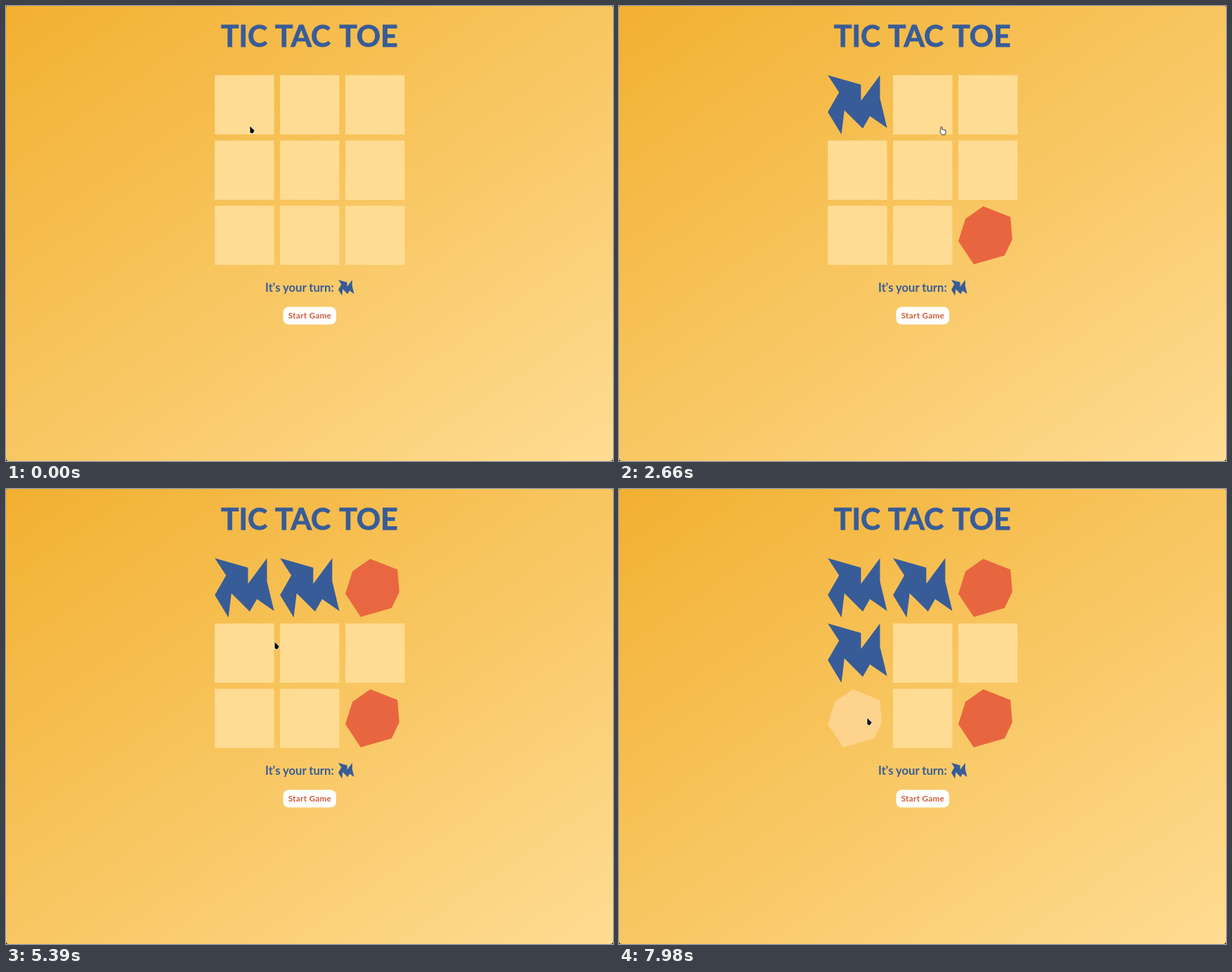
Write an HTML page that moves like this. It is 864x648 px and loops after 8 s.

```html
<!DOCTYPE html>
<html lang="en">
<head>
<meta charset="utf-8">
<title>Tic Tac Toe</title>
<style>
  html, body { margin: 0; width: 100%; height: 100%; overflow: hidden; background: #2a2010; }
  svg {
    display: block; width: 864px; height: 648px;
    border-radius: 2px 2px 4px 4px;
    background: linear-gradient(145deg, #f2b031, #f8c661 50%, #ffdc93);
  }
  text { font-family: Lato, "Open Sans", sans-serif; font-weight: 700; }
  .title { font-size: 42.5px; fill: #385c98; stroke: #385c98; stroke-width: .9px; text-anchor: middle; }
  .status { font-size: 16.6px; }
  .label { font-size: 11.8px; letter-spacing: .25px; fill: #cf5a38; text-anchor: middle; }
</style>
</head>
<body>
<svg viewBox="0 0 864 648">
  <g class="title">
    <text x="339" y="58.3">TIC</text>
    <text x="422.5" y="58.3">TAC</text>
    <text x="516" y="58.3">TOE</text>
  </g>
  <g id="board"></g>
  <g id="status">
    <text class="status" x="369" y="406.5">It's your turn:</text>
    <polygon id="icon" transform="translate(473 390) scale(.225)"/>
  </g>
  <rect x="394.5" y="428.5" width="75.5" height="25" rx="8" fill="#fff"/>
  <text class="label" x="432.4" y="444.6">Start Game</text>
  <g id="cursor">
    <circle id="ring" r="21" fill="none" stroke="#333" stroke-width="1.6" stroke-opacity=".8"/>
    <path id="arrow" d="M0 0V10L4 11.5L7 7Z" stroke="#fff" stroke-width=".8"/>
    <path id="hand" d="M-1 6V1Q0-1 1 1V4L6 5Q7 9 5 11.5H.5L-2.5 7Z"
          fill="#fff" stroke="#222" stroke-width=".9" stroke-linejoin="round"/>
  </g>
</svg>
<script>
const LOOP = 8000, STEP = 70, FADE = 800, PRESS = 140;
const LEFT = 297.2, TOP = 98.6, PITCH = 92.9, SIZE = 84.4;
const CREAM = [255, 220, 147];

// outlines in percent of a cell
const SQUARE = "0,0 100,0 100,100 0,100";
const STAR = {
  color: [56, 92, 152],
  points: "0,0 56,16 56,43 88,0 88,39 100,89 71,69 59,90 28,59 23,100 0,62 19,29"
};
const HEPTAGON = {
  color: [232, 102, 63],
  points: "42,1 88,19 91,57 78,84 26,99 0,60 12,22"
};

// The pointer glides to (x, y) between depart and arrive, then clicks.
const rest = { x: 347, y: 170.5 };
const moves = [
  { cell: 0, x: 351, y: 162, depart: 140, arrive: 210, click: 490 },
  { cell: 8, x: 506.5, y: 311.5, depart: 840, arrive: 1190, click: 1820 },
  { cell: 1, x: 458, y: 169, depart: 2280, arrive: 2800, click: 3220 },
  { cell: 2, x: 514.5, y: 152.5, depart: 3810, arrive: 4060, click: 4690 },
  { cell: 3, x: 352, y: 232, depart: 4915, arrive: 6020, click: 6650 },
  { cell: 6, x: 353, y: 325.5, depart: 7000, arrive: 7490, click: 7910 }
];
const pieceOf = move => moves.indexOf(move) % 2 ? HEPTAGON : STAR;

const $ = id => document.getElementById(id);
const show = (el, on) => el.setAttribute("visibility", on ? "visible" : "hidden");
const rgb = c => `rgb(${c.map(Math.round)})`;
const clamp = v => Math.min(1, Math.max(0, v));
const lerp = (a, b, k) => a + (b - a) * k;
const glide = k => 1 - (1 - k) ** 3;
const bezier = (a, b, s) => 3 * a * s * (1 - s) ** 2 + 3 * b * s * s * (1 - s) + s ** 3;

// CSS "ease": cubic-bezier(.25, .1, .25, 1)
function ease(x) {
  let lo = 0, hi = 1;
  for (let i = 0; i < 20; i++) {
    const mid = (lo + hi) / 2;
    if (bezier(.25, .25, mid) < x) lo = mid; else hi = mid;
  }
  return bezier(.1, 1, lo);
}

const cells = Array.from({ length: 9 }, (_, i) => {
  const el = document.createElementNS("http://www.w3.org/2000/svg", "polygon");
  const x = LEFT + i % 3 * PITCH, y = TOP + Math.floor(i / 3) * PITCH;
  el.setAttribute("transform", `translate(${x} ${y}) scale(${SIZE / 100})`);
  $("board").append(el);
  return { el, x, y, move: moves.find(m => m.cell === i) };
});

function pointerAt(t) {
  return moves.reduce((p, m) => {
    const k = glide(clamp((t - m.depart) / (m.arrive - m.depart)));
    return { x: lerp(p.x, m.x, k), y: lerp(p.y, m.y, k) };
  }, rest);
}

function render(t) {
  const taken = c => c.move && t >= c.move.click;
  for (const c of cells) {
    const piece = taken(c) && pieceOf(c.move);
    const k = piece ? ease(clamp((t - c.move.click) / FADE)) : 0;
    c.el.setAttribute("points", piece ? piece.points : SQUARE);
    c.el.setAttribute("fill", rgb(CREAM.map((v, i) => piece ? lerp(v, piece.color[i], k) : v)));
  }

  const turn = moves.filter(m => t >= m.click).length % 2 ? HEPTAGON : STAR;
  $("icon").setAttribute("points", turn.points);
  $("status").setAttribute("fill", rgb(turn.color));

  const { x, y } = pointerAt(t);
  const within = (v, min) => v >= min && v <= min + SIZE;
  const started = t >= moves[0].click;
  const hovering = started && cells.some(c => within(x, c.x) && within(y, c.y) && !taken(c));
  $("cursor").setAttribute("transform", `translate(${x} ${y})`);
  show($("hand"), hovering);
  show($("arrow"), !hovering);
  show($("ring"), hovering && moves.some(m => t >= m.click - PRESS && t < m.click));
}

const start = performance.now();
function tick() {
  const t = (performance.now() - start) % LOOP;
  render(Math.floor(t / STEP) * STEP);
  requestAnimationFrame(tick);
}
tick();
</script>
</body>
</html>
```
